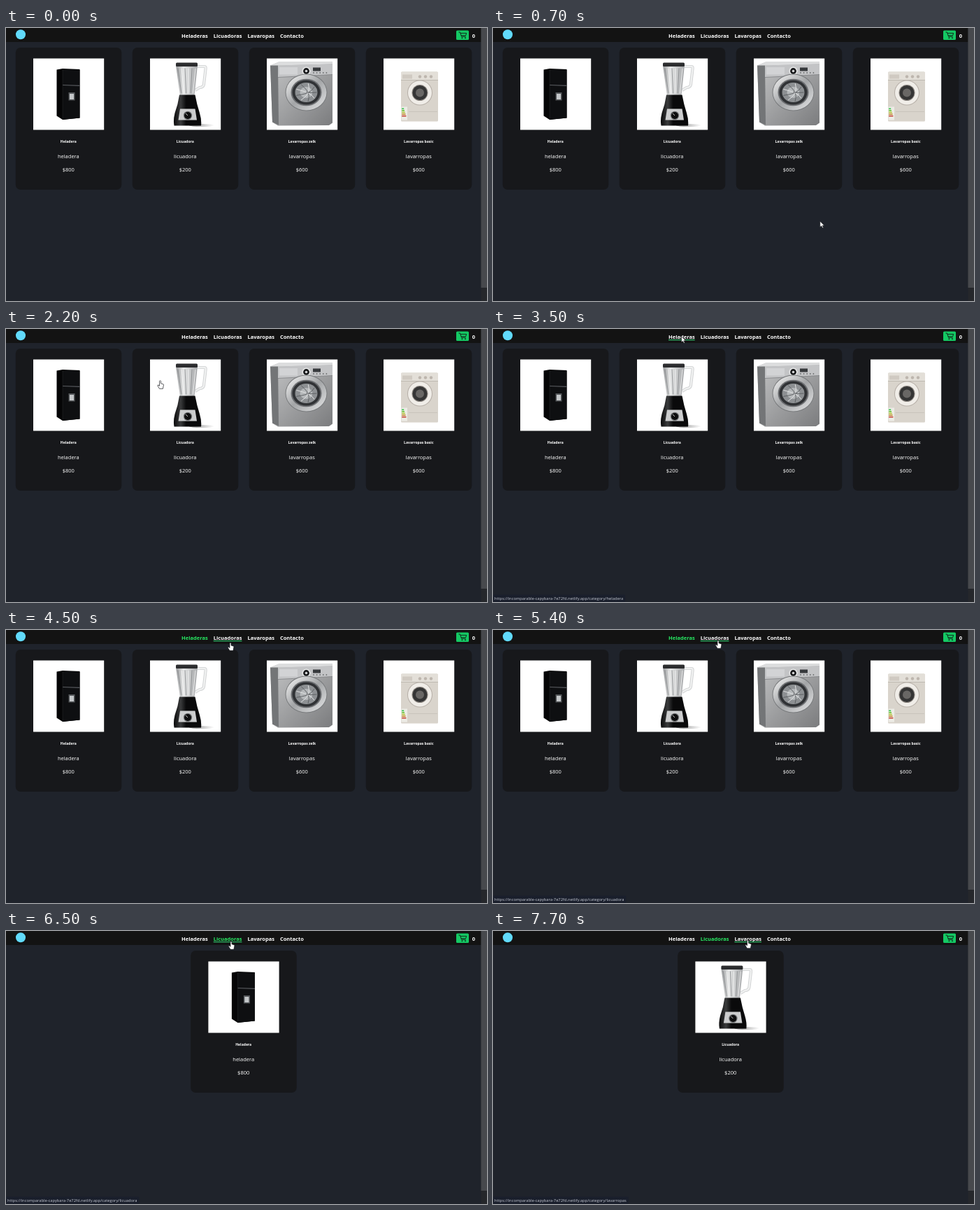
An HTML page for the animation above (8 s loop, 688 by 390 pixels).

```html
<!DOCTYPE html>
<html lang="es">
<head>
<meta charset="utf-8">
<title>Tienda</title>
<style>
html, body { margin: 0; width: 100%; height: 100%; overflow: hidden; background: #1f232b; }
svg { display: block; width: 100vw; height: 100vh; font-family: "Open Sans", "Noto Sans", sans-serif; cursor: default; }
text { fill: #fff; font-size: 7.5px; }
.mid { text-anchor: middle; }
.b { font-weight: 700; }
.name { font-weight: 700; font-size: 5.05px; }
.status { font-size: 5.77px; fill: #c6cad4; }
</style>
</head>
<body>
<svg id="stage" viewBox="0 0 688 390" preserveAspectRatio="none">
  <defs>
    <linearGradient id="steel" x2="1" y2="1"><stop stop-color="#c4c5c6"/><stop offset="1" stop-color="#7b7c7e"/></linearGradient>
    <linearGradient id="ring" x2="1" y2="1"><stop stop-color="#f6f6f6"/><stop offset=".5" stop-color="#a3a5a7"/><stop offset="1" stop-color="#e6e7e8"/></linearGradient>
    <linearGradient id="glass"><stop stop-color="#97999b"/><stop offset=".35" stop-color="#e6e7e7"/><stop offset="1" stop-color="#a4a6a8"/></linearGradient>
    <linearGradient id="black"><stop stop-color="#0a0a0b"/><stop offset=".25" stop-color="#3a3b3c"/><stop offset=".45" stop-color="#0a0a0b"/></linearGradient>
    <linearGradient id="shade"><stop stop-color="#8a8a8a"/><stop offset="1" stop-color="#fff"/></linearGradient>
  </defs>
  <rect width="688" height="390" fill="#1f232b"/>
  <g id="cards"></g>
  <rect width="680" height="20" fill="#131313"/>
  <circle cx="21" cy="9.3" r="7" fill="#61dafb"/>
  <g id="nav"></g>
  <rect x="644" y="3.5" width="18" height="13.5" rx="1.5" fill="#14c964"/>
  <g fill="none" stroke="#10281a" stroke-linejoin="round">
    <path d="M647.5 6h2l2 6.2h6.2M650 7.4h8.7l-1.2 3.4h-6.4"/>
    <circle cx="652.4" cy="14.2" r=".6"/><circle cx="657" cy="14.2" r=".6"/>
  </g>
  <text class="mid b" x="669" y="13.6">0</text>
  <rect x="679.5" width="8.5" height="390" fill="#25272b"/>
  <rect x="679.5" width="8.5" height="371" fill="#47494d"/>
  <g id="status">
    <rect id="bubble" y="379.5" height="10.5" rx="1" fill="#1a1f2c"/>
    <text id="url" class="status" x="2" y="387"></text>
  </g>
  <g id="cursor" fill="#fff" stroke="#15161a" stroke-width=".7" stroke-linejoin="round">
    <path id="arrow" d="M0 0V8.6L2 6.8 3.4 9.8 4.8 9.2 3.5 6.2H6.2Z"/>
    <path id="hand" d="M-1 .9Q0-.6 1 .9V4.3L4.6 5.4Q5 5.7 4.9 6.6L3.9 11.8H-1L-3.6 7.6Q-3.9 6.4-2.6 6.6L-1 7.8Z"/>
  </g>
</svg>
<script>
const $ = id => document.getElementById(id);
const LOOP = 8000, STEP = 100;

const box = (x, y, w, h, fill, more = '') =>
  `<rect x="${x}" y="${y}" width="${w}" height="${h}" fill="${fill}" ${more}/>`;
const shape = (d, fill) => `<path d="${d}" fill="${fill}"/>`;
const disc = (x, y, rx, fill, ry = rx) => `<ellipse cx="${x}" cy="${y}" rx="${rx}" ry="${ry}" fill="${fill}"/>`;
const line = (d, stroke, w) => `<path d="${d}" fill="none" stroke="${stroke}" stroke-width="${w}"/>`;
const repeat = (n, fn) => Array.from({ length: n }, (_, i) => fn(i)).join('');

function fridge() {
  return shape('M33.5 16 42 14.5 66.5 15.5V85L42 87.5 33.5 82Z', '#050506')
    + shape('M42 15.5 66.5 16.5V85L42 87.5Z', '#0e0f11')
    + line('M42 38 66.5 38.8', '#5a5c60', 1.2) + line('M42 15.5V87', '#2b2c2e', .5)
    + box(50.5, 48.5, 9, 11.5, '#55585b') + box(52, 50.5, 6, 8, '#c4c7c9');
}

function blender() {
  const handle = 'M67 11.5H78Q80 11.5 79.5 15L77 37Q76 41.5 71 41.5L64.5 45.5';
  return disc(74, 95.5, 18, 'url(#shade)', 2)
    + line(handle, '#cfd1d2', 4.2) + line(handle, '#f0f1f1', 2.4)
    + shape('M37 10H68L63.5 53H43Z', 'url(#glass)')
    + repeat(6, i => line(`M${40 + i * 5} 14L${45 + i * 3.3} 50`, i % 2 ? '#fafafa' : '#85878a', .8))
    + box(37, 6, 31, 5.5, '#2c2d2f', 'rx="1.5"')
    + shape('M42 52H64.5Q67 66 71 78Q74 88 73 96H34.5Q33 88 35.5 78Q40 66 42 52Z', 'url(#black)')
    + shape('M43 72H64.5L67 88H40.5Z', '#cccdce')
    + disc(54, 81.5, 6.2, '#77797b') + disc(54, 81.5, 5, '#0d0d0e') + line('M54 81.5 51 78.5', '#eee', .8);
}

function steelWasher() {
  const [x, y] = [56.5, 48.5];
  return shape('M5 10 17 5H94V92L89 95.5 16 96 8 91Z', 'url(#steel)')
    + shape('M5 10 16 8 17 95 8 91Z', '#737577')
    + shape('M5 10 17 5H94V8L16 10Z', '#dcddde')
    + shape('M16 10 94 8V23L16 27Z', '#c3c4c6') + line('M16 27 94 23', '#77797b', .7)
    + box(18, 12.5, 26, 10.5, '#d2d3d5') + box(66, 13, 11, 5, '#36393c')
    + repeat(5, i => disc(67 + i * 4.6, 20.5, .9, '#6d6f71'))
    + disc(56.5, 18, 6, '#e7e8e8') + disc(56.5, 18, 4.4, '#17181a') + disc(56.5, 18, 1.8, '#d2d3d4')
    + [[30, '#77797b'], [29, 'url(#ring)'], [22, '#6c6e71'], [20, '#303235'], [16, '#8d9093'], [9, '#b5b8ba']]
      .map(([r, c]) => disc(x, y, r, c, r * .88)).join('')
    + repeat(9, i => line(`M${x} ${y}q6 1 ${15 * Math.cos(i * .7)} ${13 * Math.sin(i * .7)}`, i % 2 ? '#e3e4e5' : '#5d6063', 1));
}

function beigeWasher() {
  const [x, y] = [52, 49];
  return box(25, 19, 53, 71, '#d9d4cc', 'rx="1.5"') + box(25, 19, 53, 12, '#e3dfd8', 'rx="1.5"')
    + line('M25 31H78', '#aaa49c', .6) + box(27, 23, 14, 6, '#d0cac2')
    + repeat(3, i => disc(52 + i * 8, 26, 2.2, '#bdb6ae'))
    + [[18, '#b6afa7'], [17, '#f0ede8'], [11.5, '#8c8782'], [10.5, '#353535'], [6, '#696765']]
      .map(([r, c]) => disc(x, y, r, c)).join('')
    + line('M36 76H77', '#b9b3ab', .5) + box(25.5, 69, 8.5, 19, '#ecebe5')
    + repeat(5, i => box(26.2, 71 + i * 2.6, 3 + i * .8, 1.6, `hsl(${130 - i * 31} 60% 48%)`));
}

const goods = [
  ['Heladera', 'heladera', '$800', fridge, '5EV0liUkWZyTs46rn9Mp'],
  ['Licuadora', 'licuadora', '$200', blender, 'q8RtC2nXbLw0YdKe7HfA'],
  ['Lavarropas zelk', 'lavarropas', '$600', steelWasher],
  ['Lavarropas basic', 'lavarropas', '$600', beigeWasher],
];
const CARD = { x: 13.8, y: 28, w: 151.5, h: 203, pitch: 167 };

function card([name, kind, price, art], x) {
  const label = (y, s, cls = '') => `<text class="mid ${cls}" x="75.5" y="${y}">${s}</text>`;
  return `<g transform="translate(${x} ${CARD.y})">`
    + box(0, 0, CARD.w, CARD.h, '#17181b', 'rx="7"')
    + `<g transform="translate(25.2 15.5)">${box(0, 0, 101.2, 102, '#fff')}${art()}</g>`
    + label(135.9, name, 'name') + label(158.2, kind) + label(177, price) + '</g>';
}

const all = goods.map((g, i) => card(g, CARD.x + i * CARD.pitch)).join('');

// Menu: each link follows the one before
let end = 251;
const links = ['Heladeras', 'Licuadoras', 'Lavaropas', 'Contacto'].map(s => {
  $('nav').insertAdjacentHTML('beforeend', `<g><text class="b" x="${end}" y="13.6">${s}</text></g>`);
  const g = $('nav').lastChild, x = end, w = g.firstChild.getComputedTextLength();
  g.insertAdjacentHTML('beforeend', box(x, 15.2, w, 1, '#35e07c'));
  end += w + 8;
  return { g, x, w };
});

const clicks = [
  { link: 0, press: 3600, load: 5500 },
  { link: 1, press: 6400, load: 6700 },
];

// Cursor stops: time, x, y
const path = [[600, 682, 290], [800, 253.5, 262], [900, 253.5, 262], [1000, 166, 240], [1200, 160, 43.5],
  [1900, 160, 50], [2100, 173, 60], [2200, 220.5, 73.5], [2700, 288, 25], [3100, 269.5, 10.5],
  [3600, 269.5, 10.5], [4100, 320, 21], [4400, 320, 21], [4600, 322, 14.5], [7200, 322, 14.5], [7700, 364.5, 13]];
const POINTER_OFF = [2700, 4400];

function place(t) {
  const i = path.findIndex(p => p[0] > t);
  const b = path.at(i), a = path[i - 1] || b;
  const k = a === b ? 0 : (t - a[0]) / (b[0] - a[0]);
  return [a[1] + (b[1] - a[1]) * k, a[2] + (b[2] - a[2]) * k];
}

const linkAt = t => {
  const [x, y] = place(t);
  return y < 18 ? links.findIndex(l => x >= l.x && x <= l.x + l.w) : -1;
};

// Address under the cursor, or nothing
function pageAt(t) {
  const [x, y] = place(t), link = linkAt(t);
  if (link >= 0) return 'category/' + goods[link][1];
  const i = Math.floor((x - CARD.x) / CARD.pitch);
  const inside = y > CARD.y && y < CARD.y + CARD.h && x - CARD.x - i * CARD.pitch < CARD.w;
  return inside && goods[i] ? 'detail/' + goods[i][4] : '';
}

const show = (id, on) => $(id).style.display = on ? '' : 'none';

let shown;
function draw(t) {
  const last = key => clicks.filter(c => c[key] <= t).pop()?.link ?? -1;
  const view = last('load'), on = last('press'), over = linkAt(t);
  if (view !== shown) $('cards').innerHTML = view < 0 ? all : card(goods[view], 264.2);
  shown = view;

  links.forEach(({ g }, i) => {
    g.firstChild.style.fill = i === on ? '#27e862' : '#fff';
    g.lastChild.style.display = i === over ? '' : 'none';
  });

  // The status bubble trails the cursor a little
  const page = pageAt(t - STEP) || pageAt(t - 2 * STEP);
  show('status', page);
  $('url').textContent = 'https://incomparable-capybara-7e72fd.netlify.app/' + page;
  if (page) $('bubble').setAttribute('width', $('url').getComputedTextLength() + 5);

  const [x, y] = place(t);
  const hand = pageAt(t) && (t < POINTER_OFF[0] || t > POINTER_OFF[1]);
  $('cursor').setAttribute('transform', `translate(${x} ${y})`);
  show('cursor', t >= path[0][0]);
  show('hand', hand);
  show('arrow', !hand);
}

const start = performance.now();
function tick() {
  const t = (performance.now() - start) % LOOP;
  draw(Math.floor(t / STEP) * STEP);
  requestAnimationFrame(tick);
}
tick();
</script>
</body>
</html>
```
